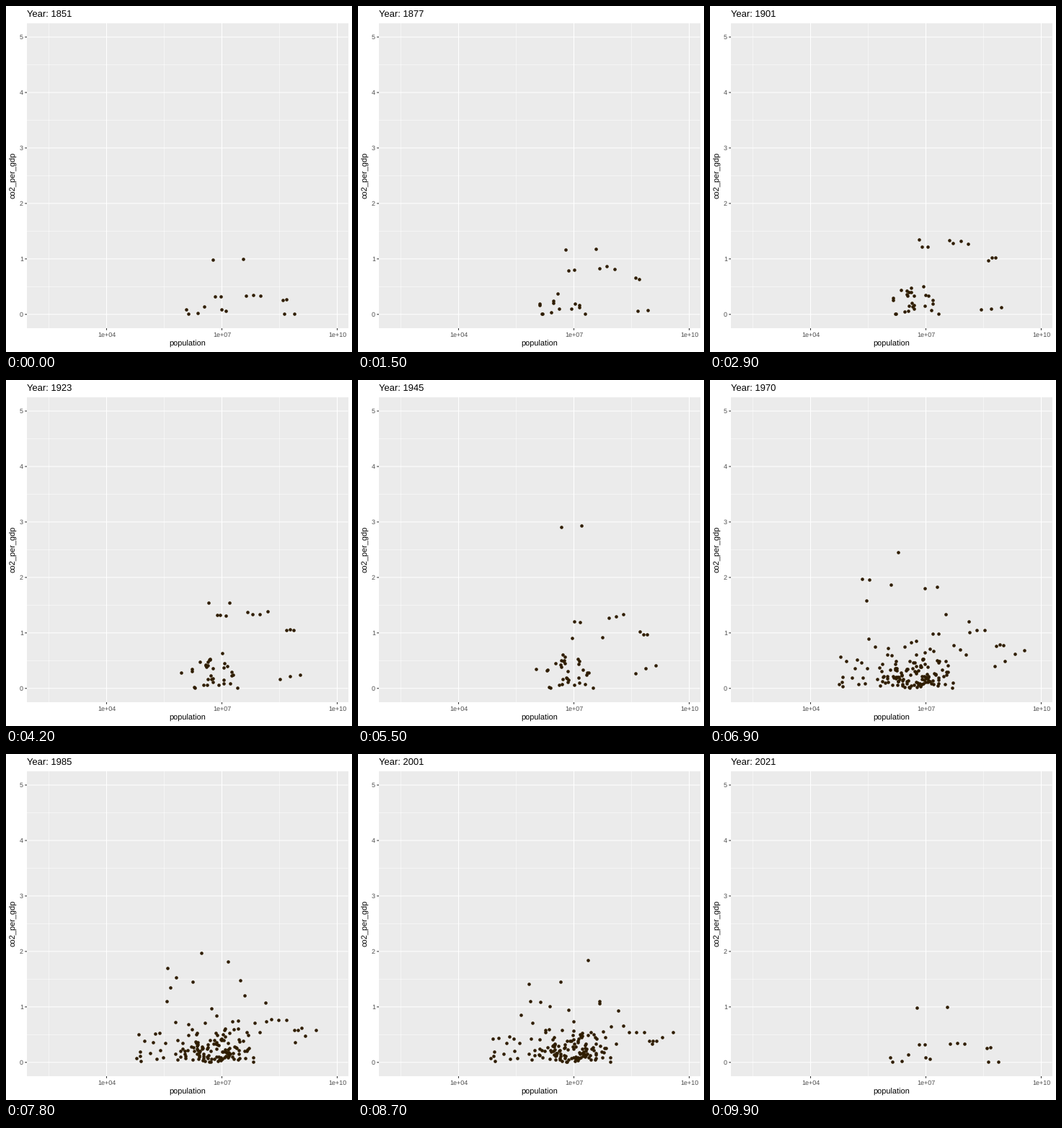
These frames come from a looping animation (480x480 px, 10 s). A matplotlib script:

```python
import numpy as np
import matplotlib.pyplot as plt
from matplotlib.animation import FuncAnimation
from matplotlib.patches import Rectangle

SIZE, FRAMES = 480, 100
LEFT, TOP, RIGHT, BOTTOM = 29, 24, 474.5, 447
ZERO, UNIT = 427.8, 76.95      # height of ratio 0, pixels per unit
MID, DECADE = 299.5, 160 / 3   # place of 1e+07, pixels per decade
FIRST, LAST = 1851, 2021
NUDGE = 0.6                    # centres markers on the pixel grid

# Shared time courses: log10 growth, and ratio curves per kind of economy.
KEYS = [1851, 1901, 1923, 1945, 1970, 2001, 2021]
DRIFT = [-.15, -.075, 0, .085, .28, .53, .62]
CURVES = dict(
    rich=[.25, .95, 1, .95, .75, .38, .28],
    pioneer=[.72, .97, 1, .67, .52, .25, .2],
    poor=[0, .1, .2, .33, .48, .42, .35],
    surge=[.3, .8, 1, 1.9, 1.2, 1, 1],
    small=[.25, .85, 1, 1, 1, .9, .7],
    modern=[1, 1, 1, 1, 1, .95, .75],
)

rng = np.random.default_rng(7)
groups = []


def add(logpop, level, curve, pace=1.0, born=FIRST, gone=LAST, wobble=0.03):
    """Add points given by their 1923 size and a ratio level."""
    n = len(logpop)
    groups.append(dict(
        logpop=np.asarray(logpop), level=level, curve=CURVES[curve], pace=pace,
        born=np.broadcast_to(born, n), gone=gone, wobble=wobble,
        phase=rng.uniform(0, 2 * np.pi, n), period=rng.uniform(2, 5, n)))


add(np.linspace(8.68, 8.87, 3), 1.04, "rich", 0.55, (1851, 1851, 1895))
add(np.linspace(8.52, 9.05, 3), np.linspace(.8, 1.25, 3), "poor", 1, (1895, 1851, 1851))
add(np.linspace(7.81, 8.2, 3), 1.36, "rich", 1.2)
add(np.linspace(6.96, 7.11, 2), 1.28, "rich", 0.8)
add([6.89, 7.68], 1.34, "pioneer", 0.8)
add([6.67, 7.2], 1.5, "surge", 0.2, 1920, 1950)

small = 34
births = np.where(np.arange(small) < 6, FIRST, rng.uniform(1855, 1920, small))
add(rng.normal(6.78, 0.42, small), 0.6 * rng.uniform(0, 1, small) ** 1.2,
    "small", 1, births, wobble=0.12)

core, tail = 83, 22
ratios = np.clip(rng.gamma(1.7, 0.17, core + tail), 0.02, 1)
add(np.clip(rng.normal(6.5, 0.5, core), 5.4, 7.9), ratios[:core],
    "modern", 1, 1950, wobble=0.12)
add(rng.uniform(4.63, 5.95, tail), ratios[core:], "modern", 0.4, 1950, wobble=0.12)

# The heaviest emitters: size and ratio in 1970, then in 2001.
heavy = np.array([
    (5.35, 1.96, 5.84, 1.41), (5.47, 1.57, 5.87, 1.10), (5.53, 1.95, 6.13, 1.08),
    (6.11, 1.86, 6.39, 1.00), (6.29, 2.45, 6.67, 1.44), (6.99, 1.80, 7.37, 1.83),
    (7.30, 1.82, 7.68, 1.09), (7.52, 1.33, 7.68, 1.05), (8.12, 1.20, 8.17, 0.92)])

# The world total is only known in some years.
total_year = [1870, 1920, 1950, 1970, 2003, 2020]
total_size = [9.14, 9.29, 9.41, 9.57, 9.80, 9.89]
total_ratio = [.47, .91, .80, .68, .40, .31]


def group_at(g, year):
    live = (g["born"] <= year) & (year < g["gone"])
    size = g["logpop"] + g["pace"] * np.interp(year, KEYS, DRIFT)
    wave = 1 + g["wobble"] * np.sin(year / g["period"] + g["phase"])
    ratio = g["level"] * np.interp(year, KEYS, g["curve"]) * wave
    return np.column_stack([size, ratio])[live]


def points_at(year):
    parts = [group_at(g, year) for g in groups]
    if year >= 1950:
        t = (year - 1970) / 31
        parts.append(heavy[:, :2] + (heavy[:, 2:] - heavy[:, :2]) * t)
    if year in (1870, 1913, 1920) or 1950 <= year <= 1982 or year >= 2003:
        parts.append([[np.interp(year, total_year, total_size),
                       np.interp(year, total_year, total_ratio)]])
    size, ratio = np.vstack(parts).T
    return np.column_stack([MID + DECADE * (size - 7), ZERO - UNIT * ratio]) - NUDGE


plt.rcParams.update({"font.family": "Liberation Sans", "text.hinting": "none"})
fig = plt.figure(figsize=(SIZE / 72, SIZE / 72), dpi=72, facecolor="white")
ax = fig.add_axes([0, 0, 1, 1])
ax.set(xlim=(0, SIZE), ylim=(SIZE, 0))
ax.axis("off")
ax.add_patch(Rectangle((LEFT, TOP), RIGHT - LEFT, BOTTOM - TOP, fc="#ebebeb", lw=0))


def rule(x, y, width, color="white"):
    ax.plot(x, y, color=color, lw=width, solid_capstyle="butt", snap=False, zorder=2)


def label(x, y, text, size, color="black", **kw):
    return ax.text(x, y, text, size=size, color=color, **{"va": "baseline", **kw})


for power in (4, 7, 10):
    x = MID + DECADE * (power - 7)
    rule([x - 1.5 * DECADE] * 2, [TOP, BOTTOM], 0.53)
    rule([x, x], [TOP, BOTTOM], 1.07)
    rule([x, x], [BOTTOM, BOTTOM + 2.75], 1.07, "#333333")
    label(x, 459, f"1e+{power:02d}", 9, "#4d4d4d", ha="center")
for v in range(6):
    y = ZERO - UNIT * v
    if v < 5:
        rule([LEFT, RIGHT], [y - UNIT / 2] * 2, 0.53)
    rule([LEFT, RIGHT], [y, y], 1.07)
    rule([LEFT - 2.75, LEFT], [y, y], 1.07, "#333333")
    label(24, y + 3.3, str(v), 9, "#4d4d4d", ha="right")

label(251.5, 472, "population", 11, ha="center")
label(15.5, 234.5, "co2_per_gdp", 11, rotation=90, ha="right", va="center")
title = label(LEFT, 15, "", 13, ha="left")
dots = ax.scatter([], [], s=21, c="#2f1d00", lw=0, zorder=3)


def draw(i):
    year = int(1851.38 + 1.72 * i)
    title.set_text(f"Year: {year}")
    # The closing frame already shows the opening points.
    dots.set_offsets(points_at(FIRST if year == LAST else year))
    return title, dots


anim = FuncAnimation(fig, draw, frames=FRAMES, interval=100, repeat=True,
                     repeat_delay=0, blit=False)
plt.show()
```
